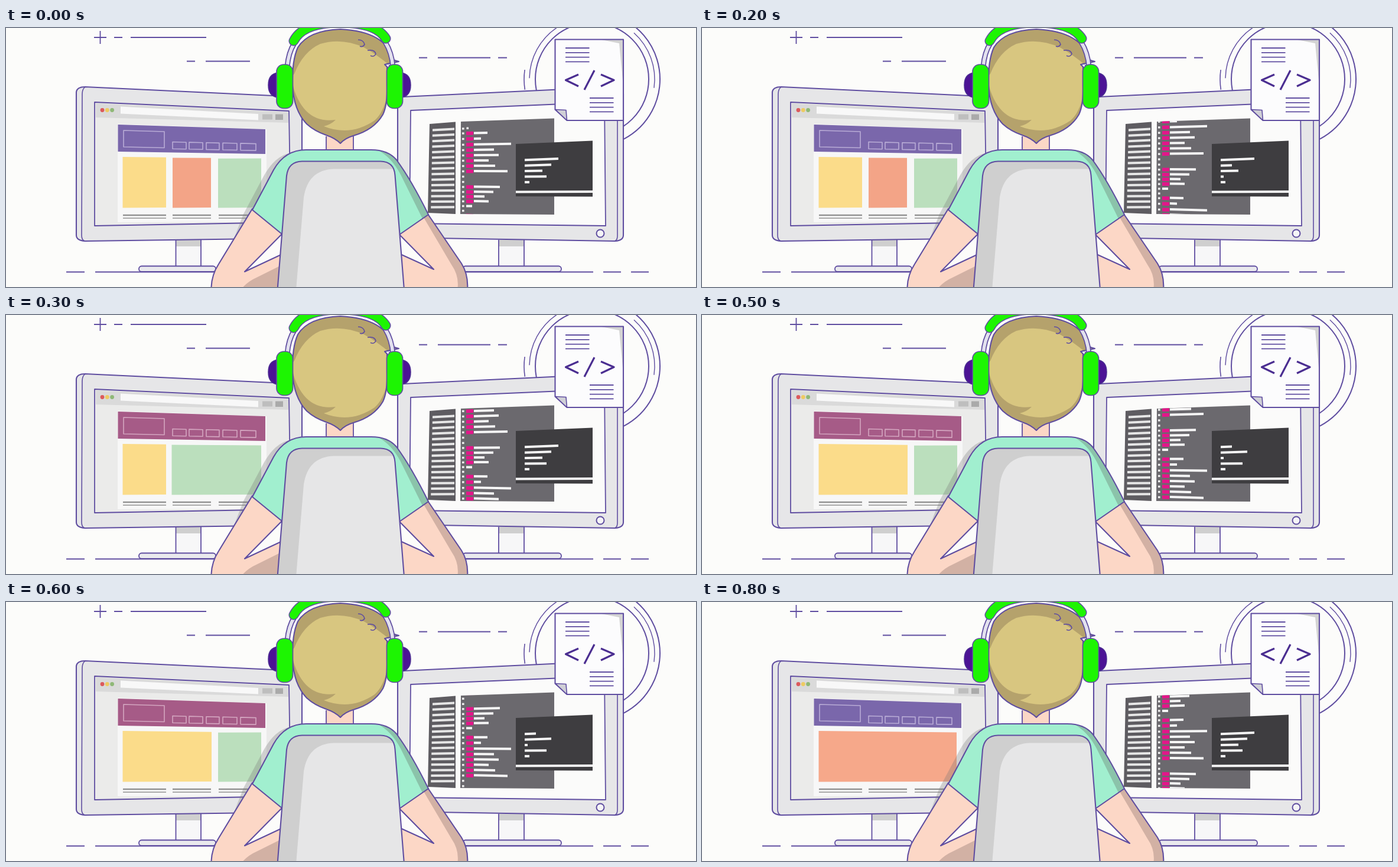
An HTML page with a canvas for the animation above (900 ms loop, 1168 px wide and 440 px high).

```html
<!DOCTYPE html>
<html lang="en">
<head>
<meta charset="utf-8">
<title>Developer at work</title>
<style>
html, body { margin: 0; width: 100%; height: 100%; overflow: hidden; background: #fcfcfa; }
canvas { display: block; }
</style>
</head>
<body>
<canvas id="stage" width="1168" height="440"></canvas>
<script>
const ctx = document.getElementById('stage').getContext('2d');
const INK = '#5f4da0', DARK = '#4b2e91', BG = '#fcfcfa';
const BEZEL = '#e6e6e8', SHADE = '#cfcfcf', SKIN = '#fcd7c6', SKIN_DARK = '#d2b1a4';
const SHIRT = '#a1efcf', SHIRT_DARK = '#8bc3aa', HAIR = '#d8c680', HAIR_DARK = '#b5a26c';
const GREEN = '#1df502', WHITE = '#f6f6f6';
const STEP = 100, STEPS = 9;

function draw(d, fill, line, width = 2.1) {
  const p = new Path2D(d);
  if (fill) { ctx.fillStyle = fill; ctx.fill(p); }
  if (line) { ctx.strokeStyle = line; ctx.lineWidth = width; ctx.stroke(p); }
}

function clipped(d, paint) {
  ctx.save();
  ctx.clip(new Path2D(d));
  paint();
  ctx.restore();
}

function pill(x, y, w, h, r, fill, line, width = 2) {
  ctx.beginPath();
  ctx.roundRect(x, y, w, h, r);
  if (fill) { ctx.fillStyle = fill; ctx.fill(); }
  if (line) { ctx.strokeStyle = line; ctx.lineWidth = width; ctx.stroke(); }
}

function rect(x, y, w, h, fill) {
  ctx.fillStyle = fill;
  ctx.fillRect(x, y, w, h);
}

function arc(x, y, r, from, to, width) {
  ctx.beginPath();
  ctx.arc(x, y, r, from * Math.PI / 180, to * Math.PI / 180);
  ctx.strokeStyle = INK;
  ctx.lineWidth = width;
  ctx.stroke();
}

function dot(x, y, r, fill, line) {
  ctx.beginPath();
  ctx.arc(x, y, r, 0, 7);
  if (fill) { ctx.fillStyle = fill; ctx.fill(); }
  if (line) { ctx.strokeStyle = line; ctx.lineWidth = 2; ctx.stroke(); }
}

// A bar whose right end is raised or lowered by the screen's perspective.
function bar(x, y, end, h, fill, rise = 0) {
  draw(`M${x},${y - h / 2}L${end},${y - h / 2 + rise}V${y + h / 2 + rise}L${x},${y + h / 2}Z`, fill);
}

function backdrop() {
  rect(0, 0, 1168, 440, BG);
  draw('M149,16H170M159.5,5V27M183,16H197M211,16H339M306,56.5H320M338,56.5H413' +
       'M699,50.5H713M731,50.5H820M833,50.5H848' +
       'M102,414.5H133M151,414.5H360M770,414.5H994M1011,414.5H1041M1058,414.5H1088', null, INK, 1.8);
  const ring = (r, from, to, width) => arc(992, 87, r, from, to, width);
  ring(115, -62, 62, 2);
  ring(115, 171, 188, 1.6);
  ring(106, 181, 236, 1.4);
  ring(106, -48, 8, 1.4);
  ring(96, 0, 360, 2);
}

function stand(x, w, baseX, baseW) {
  rect(x, 358, w, 47, '#f7f7f8');
  rect(x, 360, w, 11, SHADE);
  draw(`M${x},360V405M${x + w},360V405`, null, INK, 1.8);
  pill(baseX, 404.5, baseW, 9.5, 4.5, '#e9e9ed', INK, 1.8);
}

const leftBody = 'M134,100L495,117Q501,118 501,125V357L134,362Q119,361 119,352V109Q120,100 134,100Z';

function browser(step) {
  const alt = step >= 3 && step <= 6;
  draw('M150,126L479,141L482,330L150,336Z', '#ebebea');
  draw('M152,128L478,143V161L152,152Z', '#dadada');
  draw('M194,133.5L427,146V156.5L194,145.5Z', '#f8f8f8');
  ['#dc5a5c', '#eecb62', '#8fb877'].forEach((c, i) => dot(163 + i * 8.3, 139.5, 3.4, c));
  rect(434, 146.5, 17, 9, '#bebebe');
  rect(456, 146.5, 13, 9.5, '#aaa');

  draw('M189,163L441,172V329L189,330Z', '#f7f7f7');
  draw('M189.5,164L439,172V214L189.5,210Z', alt ? '#a65b87' : '#7a67ab');
  const trim = alt ? '#d4a6c0' : '#b9acd6';
  draw('M199,174L268,176V203.5L199,202Z', null, trim, 1.6);
  [[282, 23], [310, 23], [339, 22], [367, 24], [397, 26]].forEach(([x, w], i) => {
    const y = 193.5 + i * .6;
    draw(`M${x},${y}l${w},.7v11.5l${-w},-.5Z`, null, trim, 1.6);
  });

  const yellow = '#fbdc8a', orange = '#f3a487', green = '#bbdfbd';
  const card = (x, end, c) => {
    const y = 219 + (x - 197) * .017;
    draw(`M${x},${y}L${end},${219 + (end - 197) * .011}V305L${x},305.5Z`, c);
  };
  if (step < 3) {
    card(197.5, 271, yellow);
    card(282, 347, orange);
    card(359, 432, green);
  } else if (step < 5) {
    card(197.5, 271, yellow);
    card(280.5, 432, green);
  } else if (step < 7) {
    card(197.5, 348, yellow);
    card(359, 432, green);
  } else {
    card(197.5, 431, '#f6a88a');
  }
  [[198, 271], [282, 347], [360, 432]].forEach(([x, end]) => {
    bar(x, 318, end, 2.4, '#929292');
    bar(x, 323, end, 2, '#aaa');
  });
}

function leftMonitor(step) {
  stand(287.5, 42.5, 225, 130);
  draw(leftBody, BEZEL, INK);
  browser(step);
  draw('M150,126L479,141L482,330L150,336Z', null, INK, 1.8);
  draw('M134,100Q129,104 129,112L128,352Q128,360 133,362', null, INK, 1.6);
  clipped(leftBody, () =>
    draw('M383,365L402,316L436,252Q455,217 482,212L501,208V365Z', 'rgba(115,115,115,.3)'));
}

// Row end and offset; an end of 0 is an empty row, 789 a closing bracket.
const rows = [
  [836, 0], [825, 8.5], [810, 16.5], [817, 24.5], [789, 32.5], [0, 40.5],
  [815, 48.5], [804, 58], [855, 67.8], [826, 77], [834, 86], [817, 95],
  [828, 104], [849, 113], [0, 122], [0, 131]
];

function code(step) {
  const panel = 'M770,159L928,153.5V317L769,316Z';
  draw(panel, '#6b696e');
  const top = 270 - step * 14.7;
  clipped(panel, () => {
    for (let copy = -1; copy <= 1; copy++) {
      for (const [end, dy] of rows) {
        const y = top + copy * 139.5 + dy;
        if (y < 155 || y > 319 || (!step && y < 166)) continue;
        const rise = n => (y - 238) * .0004 * n;
        rect(772, y - 1.7, 3.6, 3.4, '#eee');
        if (end === 789) bar(779, y, 789, 4, WHITE);
        else if (end) {
          bar(779, y, 791, 6, '#e3168a', rise(12));
          bar(792, y - .5, end, 4, WHITE, rise(end - 792));
        }
      }
    }
    if (!step) rect(779.5, 168.5, 3.5, 3.5, WHITE);
  });
}

const A = [935, 923, 908, 915, 886];
const B = [935, 897, 908, 883, 886];
const C = [897, 923, 883, 915, 886];
const shells = [A, B, B, A, A, C, C, C, A];

function terminal(step) {
  draw('M863,197L993,191.5V286.5L863,286Z', '#3e3d40');
  bar(863, 278.5, 993, 3.8, WHITE, -.5);
  shells[step].forEach((end, i) =>
    bar(878, 224.3 + i * 9.4, end, 4, WHITE, (end - 878) * (i - 4) * .01));
}

function rightMonitor(step) {
  stand(834, 43, 773, 167);
  draw('M671,117L1030,100Q1045,100 1045,112V352Q1045,361 1031,362L663,356V126Q663,118 671,117Z', BEZEL, INK);
  draw('M1035,102V353Q1035,361 1030,362', null, INK, 1.6);
  draw('M685,140L1013,126L1015,336L683,332Z', '#fbfbfa', INK, 1.8);
  dot(1006, 349, 6.5, '#f5f5f6', INK);
  draw('M717,163L761,159.5V316L714,314Z', '#5e5c61');
  for (let i = 0; i < 15; i++) {
    bar(722 - i * .2, 173.5 + i * 9.35, 759, 4, '#e6e6e6', -2 + i * .14);
  }
  code(step);
  terminal(step);
}

function documentIcon() {
  const page = 'M929.5,19.5H1045V157H949.5L929.5,138.5Z';
  draw(page, '#fcfcfd');
  draw('M1008,20H1045V100L1038,26Z', '#d3d3d3');
  draw(page, null, INK);
  draw('M930,138.5L948,139.5L949.5,157Z', '#d0d0d6', INK, 1.6);
  for (let i = 0; i < 4; i++) {
    const y = i * 7.8;
    draw(`M947,${34 + y}H987.5M988,${119 + y}H1028.5`, null, INK, 1.8);
  }
  draw('M969,79L947.5,88.5L969,99M996,72L979,105M1007,79L1029,88.5L1007,99', null, DARK, 3.2);
}

function arms() {
  const left = 'M417,307L360,401Q347,421 347.5,445H470V383L404,414L468,349L440,310Z';
  const right = 'M714,316L771,400Q783,419 781,445H665V383L724,410L666,351L690,320Z';
  // Openings between the arms and the chair
  draw('M468,349L404,414L470,383Z', BG);
  draw('M666,351L724,410L665,383Z', BG);
  draw(left, SKIN);
  clipped(left, () => draw('M470,401L424,424Q408,431 397,445H470Z', SKIN_DARK));
  draw(left, null, INK);
  draw(right, SKIN);
  clipped(right, () => draw('M700,310L754,402Q768,422 764,445H790V300Z', SKIN_DARK));
  draw(right, null, INK);
}

function torso() {
  draw('M542,175H588V212H542Z', SKIN);
  draw('M542,184V207M588,184V207', null, INK, 1.8);
  arms();
  const shirt = 'M508,207H615Q646,206 661,224Q686,258 715,317L666,351L640,400H490L467,350L417,309L453,241Q472,207 508,207Z';
  draw(shirt, SHIRT);
  clipped(shirt, () => draw('M622,204Q650,215 668,249L706,326L725,320L680,220Z', SHIRT_DARK));
  draw(shirt, null, INK);

  const chair = 'M459.5,445L475,251Q478,227 501,226.5H634Q657,227 658.5,250L674,445Z';
  draw(chair, '#e6e6e7');
  clipped(chair, () =>
    draw('M450,445V220H665V239.5H555Q511,241 504,288L491,445Z', SHADE));
  draw(chair, null, INK);
}

function head() {
  const hair = 'M566,2Q512,4 494,33Q484,55 485,97Q487,140 509,163Q522,175 542,182Q557,187 566,196' +
               'Q574,187 588,183Q623,173 638,147Q646,130 645,97V66L641,62L665,57L655,54Q644,6 566,2Z';
  draw(hair, HAIR);
  clipped(hair, () => {
    draw('M480,85V0H665V64L650,64Q629,46 606,33Q568,16 532,27Q503,40 488,78Z', HAIR_DARK);
    draw('M484,92Q502,164 558,156Q550,164 538,167Q583,185 624,157Q639,144 646,112V200H484Z', HAIR_DARK);
  });
  draw(hair, null, INK);
  draw('M596,20Q605,20 607,28Q604,33 599,31M612,38Q624,36 626,44Q623,50 617,47M641,62L663,57M648,63L657,68', null, INK, 1.6);
}

function headphones() {
  const rods = 'M488,26Q478,42 476,66M642,24Q653,42 655,66';
  draw(rods, null, INK, 9);
  draw(rods, null, '#e3e1ee', 5.5);
  const band = 'M487,22C498,0 525,-9 565,-9C605,-9 632,0 643,18';
  ctx.lineCap = 'round';
  draw(band, null, INK, 17);
  draw(band, null, GREEN, 14);
  ctx.lineCap = 'butt';
  draw('M460,76Q444,78 444,97Q444,116 460,118Z', '#4c1395', DARK, 1.5);
  draw('M669,76Q685,78 685,97Q685,116 669,118Z', '#4c1395', DARK, 1.5);
  pill(458, 62, 27.5, 74.5, 12, GREEN, INK, 1.7);
  pill(644.5, 62, 27, 74.5, 12, GREEN, INK, 1.7);
}

function frame(now) {
  const step = Math.floor(now / STEP) % STEPS;
  ctx.lineJoin = 'round';
  backdrop();
  leftMonitor(step);
  rightMonitor(step);
  documentIcon();
  torso();
  head();
  headphones();
}

function loop() {
  frame(performance.now() - start);
  requestAnimationFrame(loop);
}

const start = performance.now();
loop();
</script>
</body>
</html>
```
